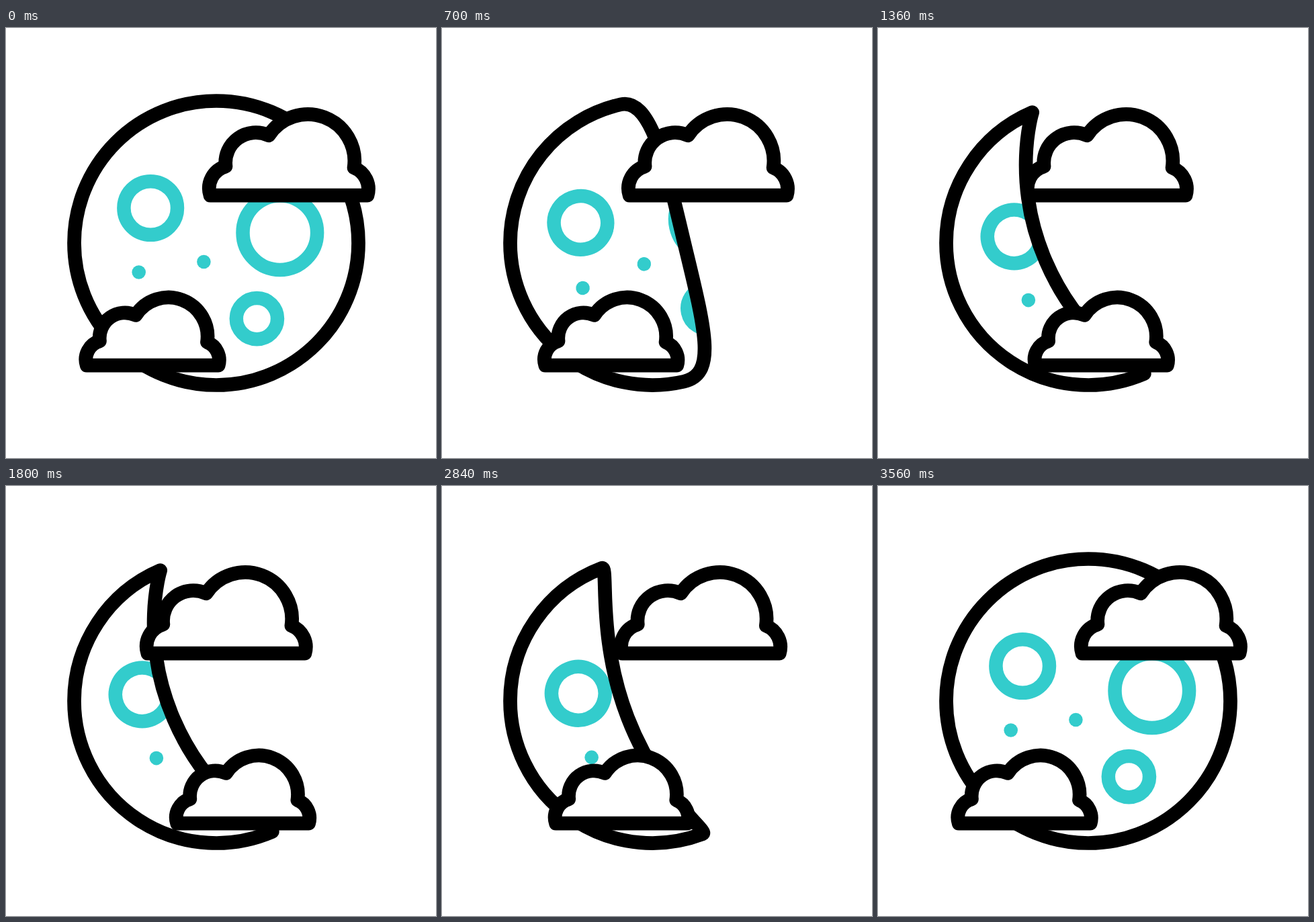
These frames come from a looping animation (640 px wide and 640 px high, 3600 ms). An HTML page:

```html
<!DOCTYPE html>
<html lang="en">
<head>
<meta charset="utf-8">
<title>Moon phases</title>
<style>
  html, body { margin: 0; width: 100%; height: 100%; overflow: hidden; background: #fff; }
  svg { display: block; width: 100vw; height: 100vh; }
  .line { stroke: #000; stroke-width: 20.7; stroke-linejoin: round; vector-effect: non-scaling-stroke; }
  .ring { fill: none; stroke: #3cc; stroke-width: 20.5; }
  .dot { fill: #3cc; }
</style>
</head>
<body>
<svg viewBox="0 0 640 640">
  <defs>
    <clipPath id="inside"><path id="mask"/></clipPath>
    <path id="cloud" class="line" fill="#fff" d="M304 249.2 A34 34 0 0 1 327 206 A45 45 0 0 1 391 160 A69.5 69.5 0 0 1 518 208 A34 34 0 0 1 538 249.2 Z"/>
  </defs>
  <g clip-path="url(#inside)">
    <g id="craters">
      <circle class="ring" cx="215.2" cy="268" r="39.8"/>
      <circle class="ring" cx="407.8" cy="304.7" r="55.3"/>
      <circle class="ring" cx="373.4" cy="432.6" r="30.6"/>
      <circle class="dot" cx="197.7" cy="363.5" r="10.3"/>
      <circle class="dot" cx="294.4" cy="348" r="10.3"/>
    </g>
  </g>
  <path id="moon" class="line" fill="none"/>
  <g id="high"><use href="#cloud"/></g>
  <g id="low"><use href="#cloud" transform="matrix(.8375 0 0 .8375 -134.4 293.5)"/></g>
</svg>
<script>
const LOOP = 3600, CX = 313, CY = 320, R = 211.5, TILT = 23.2;
const $ = id => document.getElementById(id);
const mix = (a, b, k) => a + (b - a) * k;

// Same curve as CSS cubic-bezier(x1, 0, x2, 1)
const bezier = (x1, x2) => x => {
  let lo = 0, hi = 1;
  for (let i = 0; i < 24; i++) {
    const s = (lo + hi) / 2, r = 1 - s;
    if (3 * s * r * r * x1 + 3 * s * s * r * x2 + s ** 3 < x) lo = s; else hi = s;
  }
  return lo * lo * (3 - 2 * lo);
};
const smooth = x => x * x * (3 - 2 * x);
const driftOut = bezier(.39, .55), driftBack = bezier(.65, .585);

const part = (t, from, to) => Math.min(1, Math.max(0, (t - from) / (to - from)));

// 0 to 1 during the way out, back to 0 during the way home
const trip = (t, out, back, easeOut = smooth, easeBack = smooth) =>
  easeOut(part(t, ...out)) - easeBack(part(t, ...back));

// q = 0 is the full disc, q = 1 the crescent
function moonPath(q) {
  const a = TILT * q ** 1.1 * Math.PI / 180, c = Math.cos(a), s = Math.sin(a);
  const grip = 116.8 * (1 - q), reach = mix(116.8, 131, q);
  const mx = mix(CX + R, 249.8, q), my = mix(CY, 347.2, q);
  const hx = mix(0, .396, q) * reach, hy = mix(1, .9185, q) * reach;
  const ax = CX - R * s, ay = CY - R * c, bx = CX + R * s, by = CY + R * c;
  const arc = `A${R} ${R} 0 0 1 `;
  return `M${ax} ${ay}C${ax + grip * c} ${ay - grip * s} ${mx - hx} ${my - hy} ${mx} ${my}`
    + `C${mx + hx} ${my + hy} ${bx + grip * c} ${by - grip * s} ${bx} ${by}`
    + `${arc}${CX - R} ${CY}${arc}${ax} ${ay}Z`;
}

function draw(t) {
  const d = moonPath(trip(t, [285, 1034], [2704, 3417]));
  const spin = -23 * trip(t, [306, 1063], [2757, 3497]);
  const high = -93.2 * trip(t, [120, 1840], [1840, 3400], driftOut, driftBack);
  const low = 134.6 * trip(t, [145, 1850], [1815, 3395], driftOut, driftBack);
  $('moon').setAttribute('d', d);
  $('mask').setAttribute('d', d);
  $('craters').setAttribute('transform', `rotate(${spin} ${CX} ${CY})`);
  $('high').setAttribute('transform', `translate(${high} 0)`);
  $('low').setAttribute('transform', `translate(${low} 0)`);
}

const start = performance.now();
function tick() {
  draw((performance.now() - start) % LOOP);
  requestAnimationFrame(tick);
}
tick();
</script>
</body>
</html>
```
